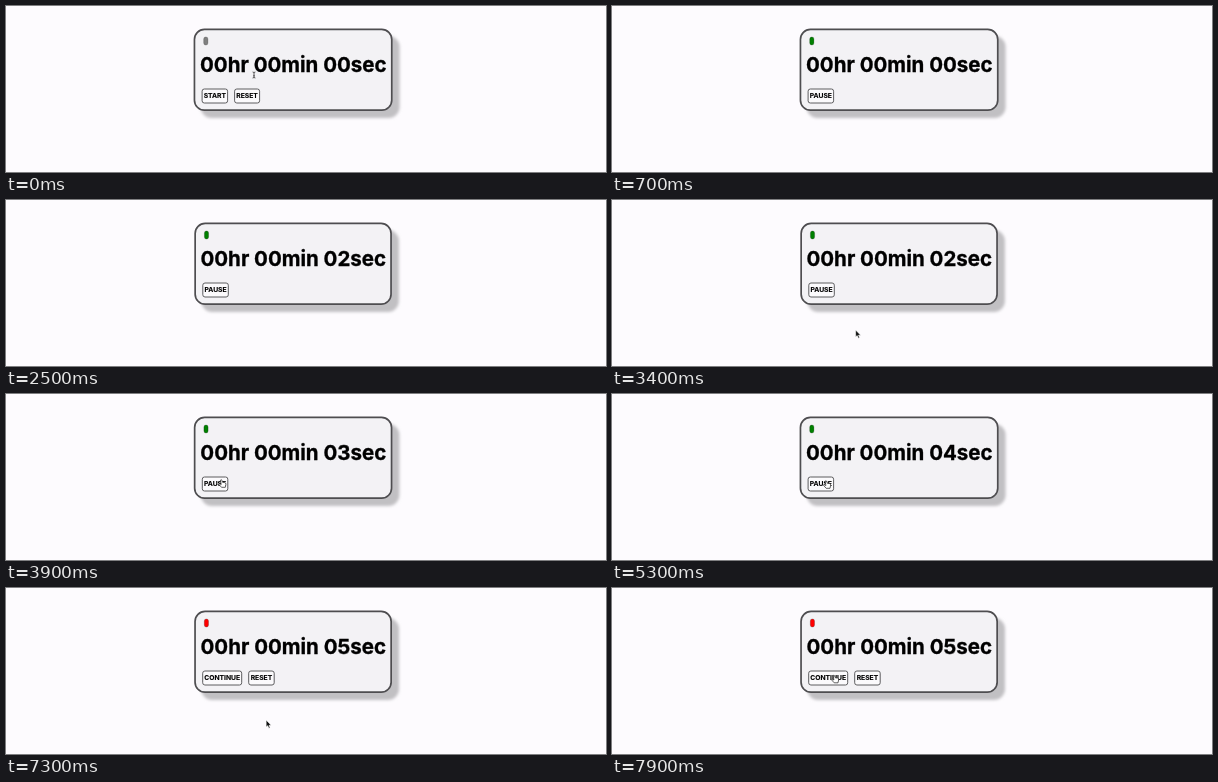
Write an HTML page that moves like this. It is 600 px wide and 166 px high and loops after 8000 ms.

```html
<!DOCTYPE html>
<html lang="en">
<head>
<meta charset="utf-8">
<title>Stopwatch</title>
<style>
  html, body { margin: 0; width: 100%; height: 100%; overflow: hidden; background: #fdfbfe; }
  svg { display: block; width: 600px; height: 166px; }
  text { font-family: Inter, sans-serif; font-weight: 700; fill: #000; text-anchor: middle; }
  #time { font-size: 20.5px; stroke: #000; stroke-width: .3; }
  #buttons text { font-size: 6.75px; stroke: #000; stroke-width: .12; }
  #buttons rect { fill: #fbfafc; stroke: #5c5c5e; stroke-width: 1; }
  #card { fill: #f3f2f5; stroke: #4e4d50; stroke-width: 1.7; }
  #shadow { fill: #c1c0c3; filter: url(#soft); }
  #led { stroke: #000; stroke-opacity: .3; stroke-width: .7; }
</style>
</head>
<body>
<svg viewBox="0 0 600 166">
  <defs>
    <filter id="soft" x="-10%" y="-20%" width="120%" height="140%">
      <feGaussianBlur stdDeviation="1.8"/>
    </filter>
  </defs>
  <rect id="shadow" y="30" height="82" rx="11"/>
  <rect id="card" y="23.4" height="80.8" rx="10"/>
  <rect id="led" y="31" width="4.2" height="8" rx="2"/>
  <text id="time" x="287.3" y="66"></text>
  <g id="buttons"></g>
  <g id="cursor">
    <path id="beam" d="M-1.4 -3Q0 -3 0 -2V2Q0 3 -1.4 3M1.4 -3Q0 -3 0 -2M0 2Q0 3 1.4 3M-.8 .8H.8"
      fill="none" stroke="#333" stroke-width=".8"/>
    <path id="arrow" d="M-2.4 -4V3L-.8 1.6L.4 4.2L1.6 3.7L.5 1.2H2.7Z"
      fill="#111" stroke="#fff" stroke-width=".6"/>
    <path id="hand" d="M-1.8 -3.4Q-1 -4.4 -.4 -3.3L.3 -1.2L2.7 -.9Q3.8 -.5 3.6 1L3 3.8H-.8L-3.4 .9Q-3.4 0 -2.4 .3L-1.1 1Z"
      fill="#fff" stroke="#222" stroke-width=".7" stroke-linejoin="round"/>
  </g>
</svg>
<script>
const LOOP = 8000, CENTER = 287.1;
const $ = id => document.getElementById(id);

// Half the card width for each count of seconds
const halfWidths = [99.5, 97.5, 98.8, 99.3, 99.5, 98.9];

const states = [
  { at: 0, led: '#808080', buttons: [['START', 26.5], ['RESET', 26]] },
  { at: 500, led: '#008000', buttons: [['PAUSE', 26.5]] },
  { at: 5900, led: '#ff0000', buttons: [['CONTINUE', 40], ['RESET', 26.5]] }
];

// time, x, y, shape
const moves = [
  [0, 248, 69, 'beam'],
  [100, 232, 84, 'arrow'],
  [200, 210, 99, 'arrow'],
  [300, 208, 91, 'hand'],
  [700, 208, 91, ''],
  [3400, 246, 134, 'arrow'],
  [3900, 216.3, 89.5, 'hand'],
  [5200, 216.3, 89.5, 'hand'],
  [5300, 215, 90.5, 'hand'],
  [5900, 215, 90.5, 'hand'],
  [6500, 267, 142, 'arrow'],
  [7200, 267, 142, 'arrow'],
  [7700, 224, 85, 'hand'],
  [7900, 223, 91, 'hand']
];

const lastAt = (list, when) => list.filter(when).pop();
const ease = k => k * k * (3 - 2 * k);

function set(el, attrs) {
  for (const key in attrs) el.setAttribute(key, attrs[key]);
}

function buttonMarkup(left, buttons) {
  let x = left;
  return buttons.map(([label, width]) => {
    const box = `<rect x="${x + .5}" y="83" width="${width - 1}" height="14" rx="2.2"/>`;
    const text = `<text x="${x + width / 2}" y="92.4">${label}</text>`;
    x += width + 6;
    return box + text;
  }).join('');
}

let shown = '';
function drawCard(t) {
  const sec = t < 1500 ? 0 : Math.min(5, Math.floor((t - 500) / 1000));
  const state = lastAt(states, s => s.at <= t);
  const key = sec + state.led;
  if (key === shown) return;
  shown = key;
  const half = halfWidths[sec], left = CENTER - half;
  set($('card'), { x: left + .85, width: 2 * half - 1.7 });
  set($('shadow'), { x: left + 7, width: 2 * half });
  set($('led'), { x: left + 10.1, fill: state.led });
  $('time').textContent = `00hr 00min 0${sec}sec`;
  $('buttons').innerHTML = buttonMarkup(left + 8, state.buttons);
}

function drawCursor(t) {
  const from = lastAt(moves, m => m[0] <= t);
  const to = moves[moves.indexOf(from) + 1] || from;
  const k = from[3] && to[3] && to !== from ? ease((t - from[0]) / (to[0] - from[0])) : 0;
  const x = from[1] + (to[1] - from[1]) * k;
  const y = from[2] + (to[2] - from[2]) * k;
  let shape = from[3];
  if (shape && shape !== 'beam') shape = y > 82 && y < 98 && x < 237 && t > 200 ? 'hand' : 'arrow';
  set($('cursor'), { transform: `translate(${x} ${y})` });
  for (const id of ['beam', 'arrow', 'hand']) $(id).style.display = id === shape ? '' : 'none';
}

function frame() {
  const t = Math.floor(performance.now() % LOOP / 100) * 100;
  drawCard(t);
  drawCursor(t);
  requestAnimationFrame(frame);
}
frame();
</script>
</body>
</html>
```
